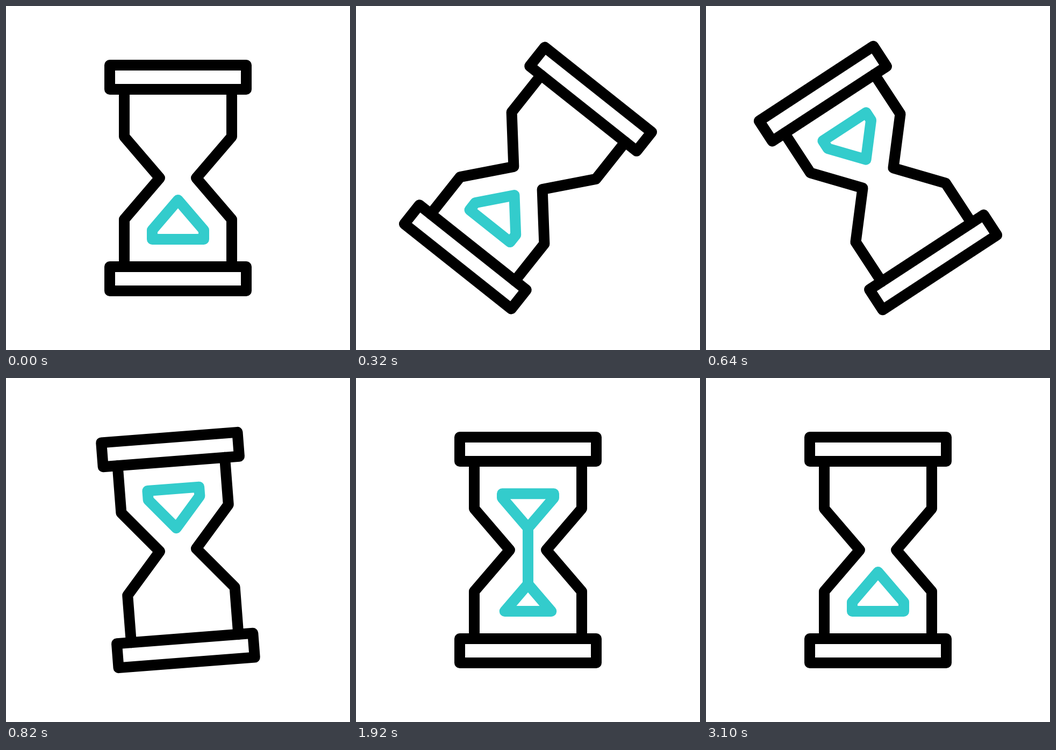
Animation, 640 px wide and 640 px high, one loop 3.6 s. Source, as an HTML page with a canvas:

```html
<!DOCTYPE html>
<html lang="en">
<head>
<meta charset="utf-8">
<title>Hourglass</title>
<style>
  html, body { margin: 0; width: 100%; height: 100%; overflow: hidden; background: #fff; }
  canvas { display: block; width: 100vmin; height: 100vmin; margin: auto; }
</style>
</head>
<body>
<canvas id="stage" width="640" height="640"></canvas>
<script>
const ctx = document.getElementById('stage').getContext('2d');
const LOOP = 3600, STEP = 20, TURN = 940;
const MID = 320, HALF = 48, CONE = 56;
const NECK = 279, FLOOR = 434, TOP = 206;
const INK = '#000', SAND = '#33cccc';

// Linear interpolation through [time, value] keys
function track(keys, t) {
  if (t <= keys[0][0]) return keys[0][1];
  for (let i = 1; i < keys.length; i++) {
    const [t0, v0] = keys[i - 1], [t1, v1] = keys[i];
    if (t <= t1) return v0 + (v1 - v0) * (t - t0) / (t1 - t0);
  }
  return keys[keys.length - 1][1];
}

// cubic-bezier(.5, 0, .5, 1)
function ease(x) {
  let lo = 0, hi = 1;
  for (let i = 0; i < 30; i++) {
    const u = (lo + hi) / 2;
    if (1.5 * u * (1 - u) + u * u * u < x) lo = u; else hi = u;
  }
  return lo * lo * (3 - 2 * lo);
}

function stroke(points, color, closed) {
  ctx.strokeStyle = color;
  ctx.beginPath();
  points.forEach(([x, y]) => ctx.lineTo(x, y));
  if (closed) ctx.closePath();
  ctx.stroke();
}

function drawGlass() {
  for (const y of [110, 485]) {
    stroke([[193, y], [447, y], [447, y + 45], [193, y + 45]], INK, true);
  }
  for (const s of [-1, 1]) {
    const out = MID + s * 100, inner = MID + s * 34;
    stroke([[out, 155], [out, 243], [inner, MID], [out, 397], [out, 485]], INK);
  }
}

// Cone with its tip at `tip` and its flat side at `base`, cut off at the widest point
function drawSand(tip, base) {
  const h = Math.abs(base - tip), dir = Math.sign(base - tip);
  if (h < 0.5) return;
  const w = Math.min(HALF, h * HALF / CONE);
  const points = [[MID, tip], [MID + w, base], [MID - w, base]];
  if (h > CONE) {
    const shoulder = tip + dir * CONE;
    points.splice(1, 0, [MID + w, shoulder]);
    points.push([MID - w, shoulder]);
  }
  stroke(points, SAND, true);
}

const pileKeys = [[1430, 0], [1620, 40], [1780, 47], [2160, 56.5], [2400, 63], [2700, 73]];
const levelKeys = [[1630, TOP], [2160, 223], [2400, 250.5], [2650, NECK]];
const tailKeys = [[2650, NECK], [3100, 361]];

function drawStream(t, apex) {
  const front = 422 + (t - 1400) * 0.318;
  const tail = track(tailKeys, t);
  // Two drops, then the steady stream: [front lag, length]
  for (const [lag, len] of [[0, 8], [50, 16], [110, 1e6]]) {
    const end = front - lag;
    const y0 = Math.max(tail, end - len), y1 = Math.min(apex, end);
    if (y1 > y0) stroke([[MID, y0], [MID, y1]], SAND);
  }
}

function draw(t) {
  ctx.fillStyle = '#fff';
  ctx.fillRect(0, 0, 640, 640);
  ctx.lineWidth = 20;
  ctx.lineCap = ctx.lineJoin = 'round';
  ctx.save();
  if (t < TURN) {
    ctx.translate(MID, MID);
    ctx.rotate(Math.PI * ease(t / TURN));
    ctx.translate(-MID, -MID);
    drawGlass();
    drawSand(361, FLOOR);
  } else {
    const apex = FLOOR - track(pileKeys, t);
    drawGlass();
    drawSand(NECK, track(levelKeys, t));
    drawSand(apex, FLOOR);
    drawStream(t, apex);
  }
  ctx.restore();
}

const start = performance.now();
function tick() {
  const t = (performance.now() - start) % LOOP;
  draw(Math.floor(t / STEP) * STEP);
  requestAnimationFrame(tick);
}
tick();
</script>
</body>
</html>
```
